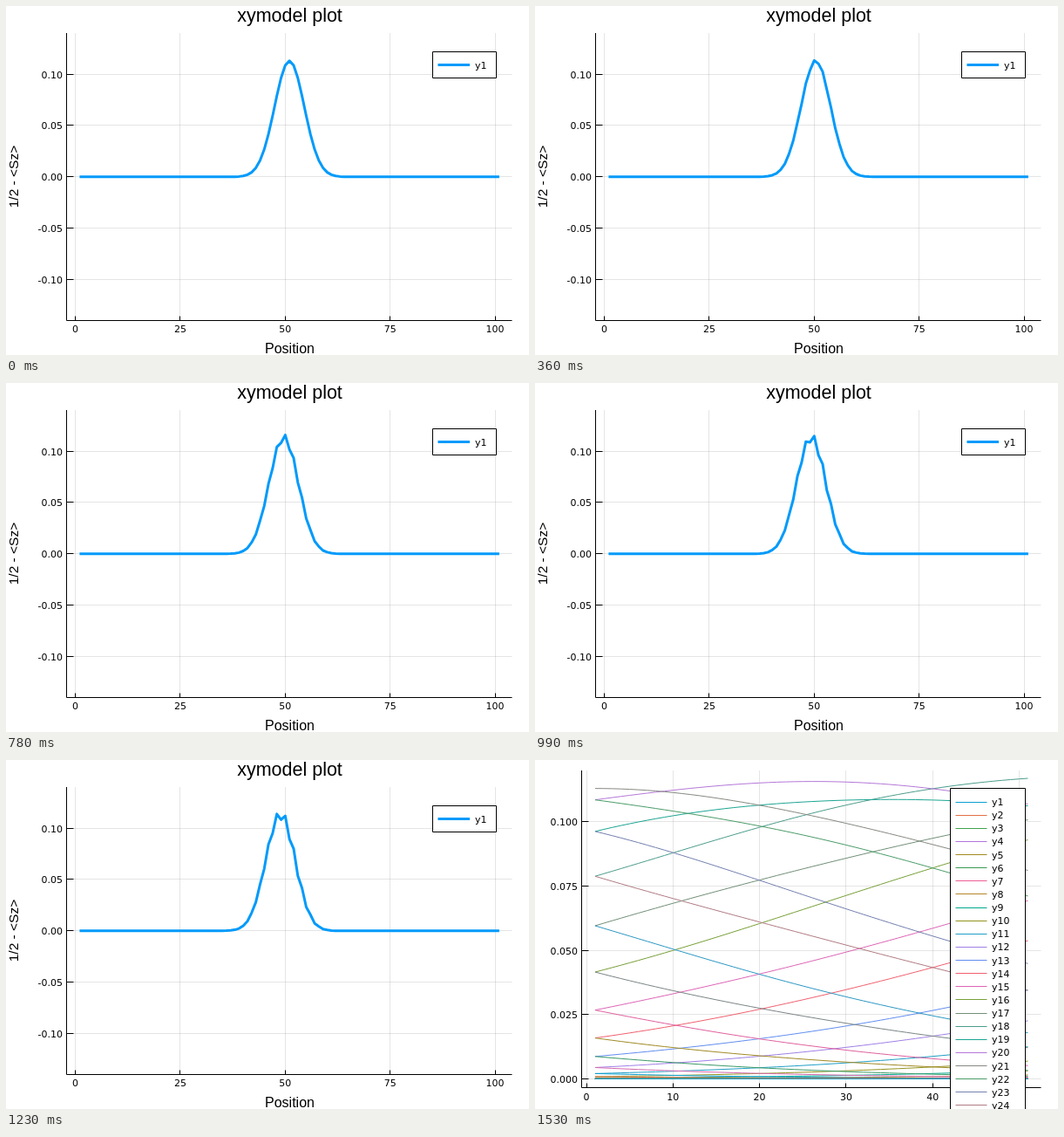
Write an HTML page with a canvas that moves like this. It is 600 px wide and 400 px high and loops after 1.56 s.

```html
<!DOCTYPE html>
<html>
<head>
<meta charset="utf-8">
<style>
  html, body { margin: 0; width: 600px; height: 400px; overflow: hidden; background: #fff }
  canvas { display: block }
</style>
</head>
<body>
<canvas id="stage" width="600" height="400"></canvas>
<script>
const ctx = document.getElementById('stage').getContext('2d');
const SITES = 101, STEPS = 51, STEP_MS = 30, LOOP_MS = 1560;
const SMALL = '11px "DejaVu Sans", sans-serif';
const LARGE = '"Liberation Sans", Arial, sans-serif';
const palette = ('#0a9fd0 #e36f47 #3ea44e #b273dc #a38b20 #3a9a55 #ed5e93 #b5862a #00a98d #94941e ' +
  '#1f9fc6 #a07fe6 #618df0 #f0606f #dd65b6 #78a038 #718f78 #4c9d8c #1ca592 #b578d8 ' +
  '#868a82 #4a9c68 #7480b0 #b07c84 #2c98c4 #7b8586 #e0609f #a08a25 #3a9a68 #d568b0').split(' ');

// Drifting wave packet with a slowly growing even/odd ripple.
function density(site, step) {
  const drift = 0.0523 * step;
  const x = site - 51 + drift;
  const ripple = 0.0435 * (1 - Math.exp(-((step / 25) ** 2))) * Math.exp(x * drift / 25);
  const sign = site % 2 ? -1 : 1;
  return Math.exp(-x * x / 25) / (5 * Math.sqrt(Math.PI)) * (1 + sign * ripple);
}

function polyline(points, color, width = 1) {
  ctx.beginPath();
  for (const [x, y] of points) ctx.lineTo(x, y);
  ctx.strokeStyle = color;
  ctx.lineWidth = width;
  ctx.lineJoin = 'round';
  ctx.stroke();
}

function text(str, x, y, align = 'left', font = SMALL) {
  ctx.font = font;
  ctx.textAlign = align;
  ctx.fillStyle = '#000';
  ctx.fillText(str, x, y);
}

const crisp = v => Math.floor(v) + 0.5;

function axes({ left, top, bottom, xTicks, yTicks, px, py, digits, labelX, labelY }) {
  const right = 580.5, grid = 'rgba(0,0,0,0.1)', black = '#000';
  for (const v of xTicks) {
    const x = crisp(px(v));
    polyline([[x, top], [x, bottom]], grid);
    polyline([[x, bottom], [x, bottom - 5]], black);
    text(v, px(v), labelY, 'center');
  }
  for (const v of yTicks) {
    const y = crisp(py(v));
    polyline([[left, y], [right, y]], grid);
    polyline([[left, y], [left + 8, y]], black);
    text(v.toFixed(digits), labelX, y + 4, 'right');
  }
  polyline([[left, top], [left, bottom], [right, bottom]], black);
}

function box(x, y, w, h) {
  ctx.fillStyle = '#fff';
  ctx.fillRect(x, y, w, h);
  ctx.strokeStyle = '#000';
  ctx.lineWidth = 1;
  ctx.strokeRect(x, y, w, h);
}

const range = (n, f) => Array.from({ length: n }, (_, i) => f(i));

function drawPacket(step) {
  const px = v => 79.6 + 4.815 * v, py = v => 195.8 - 1178 * v;
  axes({
    left: 69.5, top: 31, bottom: 360.5, px, py, digits: 2, labelX: 65, labelY: 374,
    xTicks: [0, 25, 50, 75, 100], yTicks: [-0.1, -0.05, 0, 0.05, 0.1]
  });
  text('xymodel plot', 325.5, 18, 'center', '21.5px ' + LARGE);
  text('Position', 325.5, 398, 'center', '16px ' + LARGE);
  ctx.save();
  ctx.translate(14, 195.5);
  ctx.rotate(-Math.PI / 2);
  text('1/2 - <Sz>', 0, 0, 'center', '15.5px ' + LARGE);
  ctx.restore();
  polyline(range(SITES, i => [px(i + 1), py(density(i + 1, step))]), '#009afa', 3);
  box(489.5, 52.5, 73, 30);
  polyline([[495.5, 67.5], [532, 67.5]], '#009afa', 3);
  text('y1', 538, 72);
}

function drawHistory() {
  const px = v => 59 + 9.93 * v, py = v => 365.5 - 2950 * v;
  axes({
    left: 53.5, top: 12, bottom: 375.5, px, py, digits: 3, labelX: 49, labelY: 390,
    xTicks: [0, 10, 20, 30, 40, 50], yTicks: [0, 0.025, 0.05, 0.075, 0.1]
  });
  for (let site = 1; site <= SITES; site++)
    polyline(range(STEPS, s => [px(s + 1), py(density(site, s))]), palette[(site - 1) % 30]);
  box(476.5, 32.5, 86, 400);
  for (let i = 0; i < 24; i++) {
    const y = 48 + 15.13 * i;
    polyline([[482.5, crisp(y)], [518.5, crisp(y)]], palette[i]);
    text('y' + (i + 1), 524, Math.round(y + 4));
  }
}

function frame() {
  const step = Math.floor(performance.now() % LOOP_MS / STEP_MS);
  ctx.fillStyle = '#fff';
  ctx.fillRect(0, 0, 600, 400);
  if (step < STEPS) drawPacket(step);
  else drawHistory();
  requestAnimationFrame(frame);
}
frame();
</script>
</body>
</html>
```
